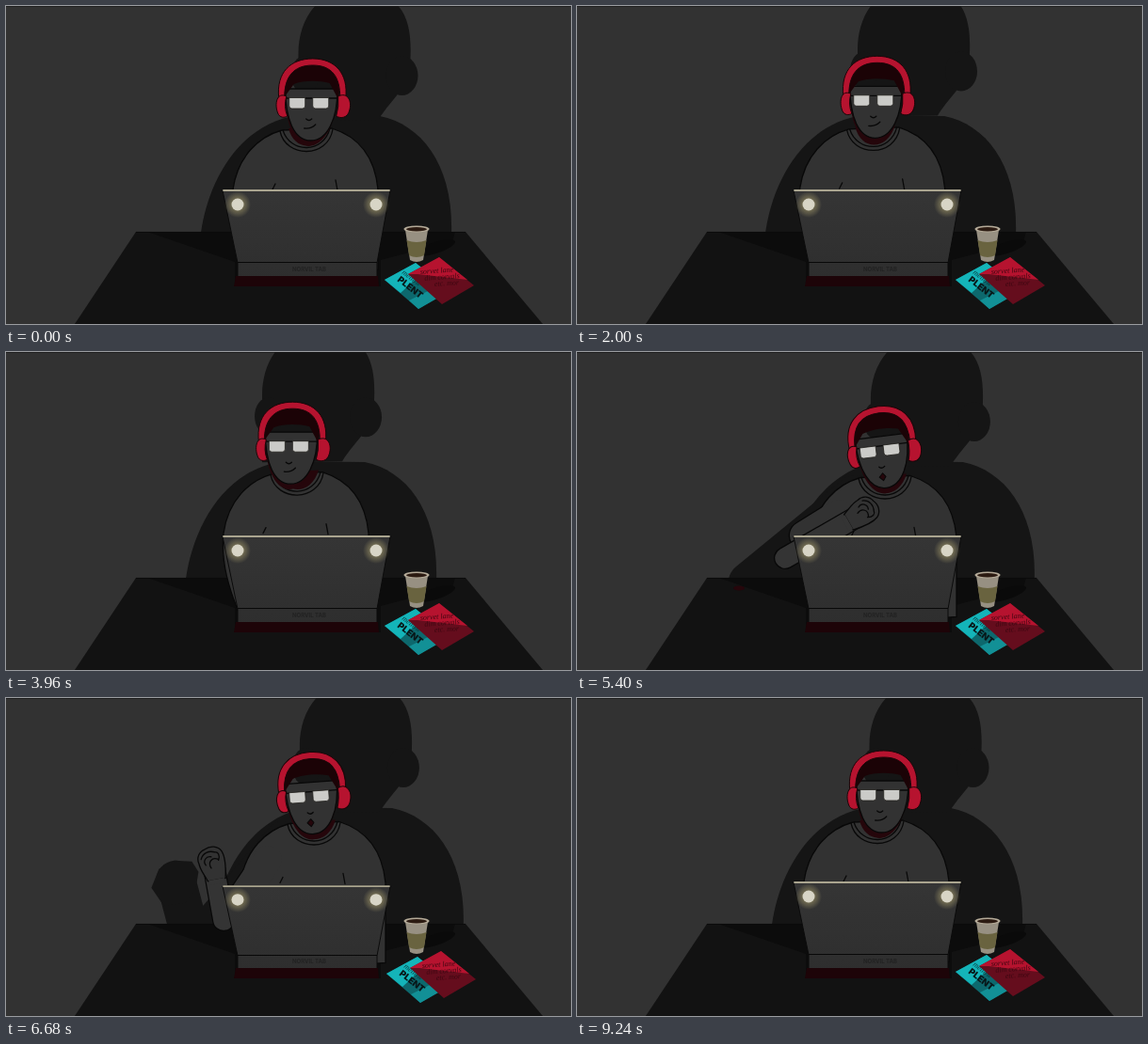
Write an HTML page that moves like this. It is 600 px wide and 338 px high and loops after 9.28 s.

```html
<!DOCTYPE html>
<html lang="en">
<head>
<meta charset="utf-8">
<title>Night desk</title>
<style>
  html, body { margin: 0; width: 100%; height: 100%; overflow: hidden; background: #323232; }
  svg { position: fixed; inset: 0; width: 100%; height: 100%; }
  .line { fill: none; stroke: #080808; stroke-width: 1.3; stroke-linecap: round; stroke-linejoin: round; }
  .cloth { fill: #323232; stroke: #080808; stroke-width: 1.3; }
  .red { fill: #b6132f; stroke: #1c0508; stroke-width: 1; }
  .limb { fill: none; stroke-linecap: round; stroke-linejoin: round; }
  .title { font: 900 9.5px Inter, sans-serif; fill: #081719; }
  .script { font: italic 8px "Liberation Serif", serif; fill: #3d0711; }
  .label { font: 700 6px Inter, sans-serif; fill: #222; text-anchor: middle; }
</style>
</head>
<body>
<svg viewBox="0 0 600 338" preserveAspectRatio="none">
  <defs>
    <clipPath id="wallClip"><path d="M0 0H600V241H0Z"/></clipPath>
    <radialGradient id="glow">
      <stop offset=".4" stop-color="#b9ad75" stop-opacity=".5"/>
      <stop offset="1" stop-color="#b9ad75" stop-opacity="0"/>
    </radialGradient>
    <linearGradient id="lidShade" x2="0" y2="1">
      <stop stop-color="#353535"/><stop offset="1" stop-color="#2e2e2e"/>
    </linearGradient>
  </defs>

  <rect width="600" height="338" fill="#323232"/>
  <rect width="600" height="1" fill="#202020"/>

  <g clip-path="url(#wallClip)" fill="#151515" stroke="#151515" stroke-width="0">
    <path id="bodyShadow" d="M207 241C214 190 245 125 311 116L397 117C442 126 475 170 473 241Z"/>
    <g id="headShadow">
      <path d="M311 122V50C311 30 318 8 334-5H412C428 8 431 30 430 55C428 90 412 95 396 121Z"/>
      <ellipse cx="421" cy="74" rx="17" ry="21"/>
      <ellipse cx="318" cy="73" rx="15" ry="20"/>
    </g>
    <g id="armShadow">
      <path id="armShadowLine" class="limb" stroke-width="42"/>
      <path id="fistShadow" d="M-26 8L-18-12L-2-21L17-20L24-9L21 10L10 24L-13 27Z"/>
    </g>
  </g>

  <path d="M138 240H488L570 338H73Z" fill="#121212"/>
  <path d="M150 240H477L474 250L398 270V298H243V272Z" fill="#0c0c0c"/>
  <path d="M138 240.4H488" stroke="#0b0b0b"/>
  <ellipse id="spot" cx="172" cy="251" rx="6" ry="2.6" fill="#26060b"/>

  <path id="armOutline" class="limb" stroke="#080808" stroke-width="32.5"/>
  <g id="body">
    <path class="cloth" d="M262 290C246 255 238 225 241 195C246 160 268 139 293 132L346 130C378 140 392 164 395 195V280Z"/>
    <path d="M300 130C306 155 334 155 342 128Z" fill="#25060b"/>
    <path class="line" d="M291 133C297 162 342 162 347 131M294 132C302 157 337 157 344 130M286 189L283 195M350 185L352 196"/>
  </g>
  <g id="arm">
    <path id="sleeve" class="limb" stroke="#323232" stroke-width="30"/>
    <path id="forearmEdge" class="limb" stroke="#080808" stroke-width="24"/>
    <path id="forearm" class="limb" stroke="#343434" stroke-width="21.5"/>
    <g id="fist">
      <path class="cloth" d="M-17-9C-8-12-4-15 3-15C10-17 16-12 17-6C20 0 18 8 12 11C5 14-8 12-17 10Z"/>
      <path d="M-19-8V9" stroke="#343434" stroke-width="5"/>
      <path class="line" d="M0-8C5-11 10-6 8-1M7-12C14-9 15-2 12 4M-4-3C3-6 8 0 4 6M3 6C8 9 12 7 12 4"/>
    </g>
  </g>

  <g id="head">
    <path d="M297 94C297 125 306 147 322 149C338 148 351 126 352 94Z" fill="#25060b"/>
    <path class="cloth" d="M297 88C297 120 306 143 324 143C341 143 353 120 352 88Z"/>
    <path d="M295 98C291 76 304 62 326 62C348 62 358 77 353 99L344 82C332 79 316 79 306 83Z" fill="#1b0306"/>
    <path class="line" d="M297 98H352"/>
    <g fill="#cbcbc8" stroke="#24231f" stroke-width=".8">
      <path d="M301 97.5H318V106Q318 109 315 109H304Q301 109 301 106Z"/>
      <path d="M326 97.5H343V106Q343 109 340 109H329Q326 109 326 106Z"/>
    </g>
    <path class="line" d="M319 120Q322 123 325 120"/>
    <path id="smile" class="line" d="M317 130Q324 131 329 126"/>
    <path id="openMouth" d="M322 127L325 131L322 135L318 131Z" fill="#25060b" stroke="#080808" stroke-linejoin="round"/>
    <path class="red" d="M290 98C287 70 303 56 326 56C350 56 364 72 361 98L355 97C355 76 347 63 326 63C305 63 296 76 296 97Z"/>
    <path class="red" d="M298 96C288 91 285 104 289 114C291 119 296 119 299 117Q295 107 298 96Z"/>
    <path class="red" d="M353 96C363 91 368 101 365 111C363 119 356 120 351 117Q354 107 353 96Z"/>
  </g>

  <g id="laptop">
    <path d="M230 196H408L394 273V290H246V273Z" fill="url(#lidShade)" stroke="#0b0b0b"/>
    <path d="M246 272.5H394" stroke="#080808"/>
    <path d="M231 196H407" stroke="#aaa58f" stroke-width="1.8" stroke-linecap="round"/>
    <text class="label" x="322" y="281.5">NORVIL TAB</text>
    <circle cx="246" cy="211" r="14" fill="url(#glow)"/>
    <circle cx="393" cy="211" r="14" fill="url(#glow)"/>
    <circle cx="246" cy="211" r="6.5" fill="#d8d5c6"/>
    <circle cx="393" cy="211" r="6.5" fill="#d8d5c6"/>
  </g>
  <path d="M244 287H395L396 298H242Z" fill="#1d0408"/>

  <ellipse cx="456" cy="257" rx="22" ry="6" fill="#0a0a0a" transform="rotate(-18 456 257)"/>
  <path d="M424 238H448L443 270Q436 274 429 270Z" fill="#979082"/>
  <path d="M425.5 249Q436 253 446.5 249L444 265Q436 269 428 265Z" fill="#69633f"/>
  <ellipse cx="436" cy="237" rx="13.5" ry="3.6" fill="#b4aa98"/>
  <ellipse cx="436" cy="237.3" rx="11" ry="2.2" fill="#2c1b12"/>

  <g id="books">
    <path d="M402 291L435 273L471 303L438 322Z" fill="#0d686d"/>
    <path d="M402 291L435 273L445 281L419 305Z" fill="#14b4b9"/>
    <path d="M438 322L471 303L462 296L428 313Z" fill="#129096"/>
    <text class="title" transform="translate(415 292) rotate(38)">PLENT</text>
    <text class="script" style="fill:#073f42" transform="translate(420 284) rotate(38)">mellow</text>
    <path d="M427 285L460 267L497 297L463 317Z" fill="#650d1d"/>
    <path d="M427 285L460 267L490 291L437 285Z" fill="#b6132f"/>
    <g transform="translate(440 285) rotate(-4)" class="script">
      <text>sorvet lane</text><text x="4" y="7">dim corvals</text><text x="14" y="14">etc. mor</text>
    </g>
  </g>
</svg>
<script>
const LOOP = 9280, BEAT = 1130;
const el = Object.fromEntries([...document.querySelectorAll("[id]")].map(e => [e.id, e]));
const set = (id, name, value) => el[id].setAttribute(name, value);
const move = (id, x, y, rest = "") => set(id, "transform", `translate(${x} ${y}) ${rest}`);
const show = (id, on) => set(id, "visibility", on ? "visible" : "hidden");
const line = (...points) => "M" + points.map(p => p.join(" ")).join("L");
const smooth = (t, a, b) => {
  const u = Math.min(1, Math.max(0, (t - a) / (b - a)));
  return u * u * (3 - 2 * u);
};

// Each key is [time, ...values]; values ease from one key to the next.
function keyed(t, keys) {
  let values = keys[0].slice(1);
  for (let i = 1; i < keys.length; i++) {
    const u = smooth(t, keys[i - 1][0], keys[i][0]);
    values = values.map((v, j) => v + (keys[i][j + 1] - keys[i - 1][j + 1]) * u);
  }
  return values;
}

const fistKeys = [
  [4760, 255, 235], [5080, 238, 172], [5360, 303, 172], [5760, 301, 170],
  [6080, 178, 188], [6400, 172, 238], [6660, 220, 176], [6760, 222, 180], [7040, 264, 242]
];
const elbowKeys = [
  [4760, 265, 242], [5080, 218, 216], [5400, 221, 219], [5800, 221, 219],
  [6400, 226, 232], [6680, 231, 236], [7040, 270, 252]
];
const tiltKeys = [[4500, 0], [4900, -4], [5400, -7], [6400, -5], [6680, -4], [7020, 0]];
const bookKeys = [[6380, 0], [6430, 4], [6600, 2], [7500, 1.2], [8200, .7], [9000, 0]];
const lidKeys = [[6380, 1], [6440, .94], [6680, .96], [6860, 1]];

function drawArm(t) {
  const active = t > 4760 && t < 7040;
  for (const id of ["arm", "armOutline", "armShadow"]) show(id, active);
  if (!active) return;
  const fist = keyed(t, fistKeys), elbow = keyed(t, elbowKeys);
  const cuff = [elbow[0] + 20, elbow[1] - 24], shoulder = [278, 172];
  const angle = Math.atan2(fist[1] - elbow[1], fist[0] - elbow[0]) * 180 / Math.PI;
  const cast = ([x, y]) => [180 + 1.75 * (x - 220), 192 + 1.2 * (y - 175)];
  set("armOutline", "d", line(shoulder, cuff));
  set("sleeve", "d", line(shoulder, cuff));
  set("forearmEdge", "d", line(elbow, fist));
  set("forearm", "d", line(elbow, fist));
  move("fist", ...fist, `rotate(${angle})`);
  set("armShadowLine", "d", line([295, 152], cast(elbow), cast(fist)));
  move("fistShadow", ...cast(fist));
}

function draw(t) {
  const hold = smooth(t, 4520, 4800) * (1 - smooth(t, 6800, 7040));
  const phase = 2 * Math.PI * (t < 6000 ? t : t - 9240) / BEAT;
  const sway = 1 - hold;
  const bodyX = -5 * (1 - Math.cos(phase)) * sway + 8 * hold;
  const bodyY = -1.2 * (1 - Math.cos(phase)) * sway + 1.5 * hold;
  const headX = -11 * (1 - Math.cos(phase + .22)) * sway + .5 * hold;
  const headY = (-1.4 * (1 - Math.cos(phase)) - 1.5 * Math.sin(phase) ** 2) * sway + 1.5 * hold;
  const [tilt] = keyed(t, tiltKeys), [shift] = keyed(t, bookKeys), [lid] = keyed(t, lidKeys);

  move("body", bodyX, bodyY);
  move("head", headX, headY, `rotate(${tilt} 325 110)`);
  move("bodyShadow", bodyX * 1.6, 0);
  move("headShadow", headX * 1.8, Math.min(0, headY * 1.7));
  move("laptop", 0, 297 * (1 - lid), `scale(1 ${lid})`);
  move("books", shift, shift);

  const singing = t > 4840 && t < 6900;
  show("openMouth", singing);
  show("smile", !singing);
  show("spot", t > 4960 && t < 6400);
  drawArm(t);
}

function frame(now) {
  draw(now % LOOP);
  requestAnimationFrame(frame);
}
draw(0);
requestAnimationFrame(frame);
</script>
</body>
</html>
```
